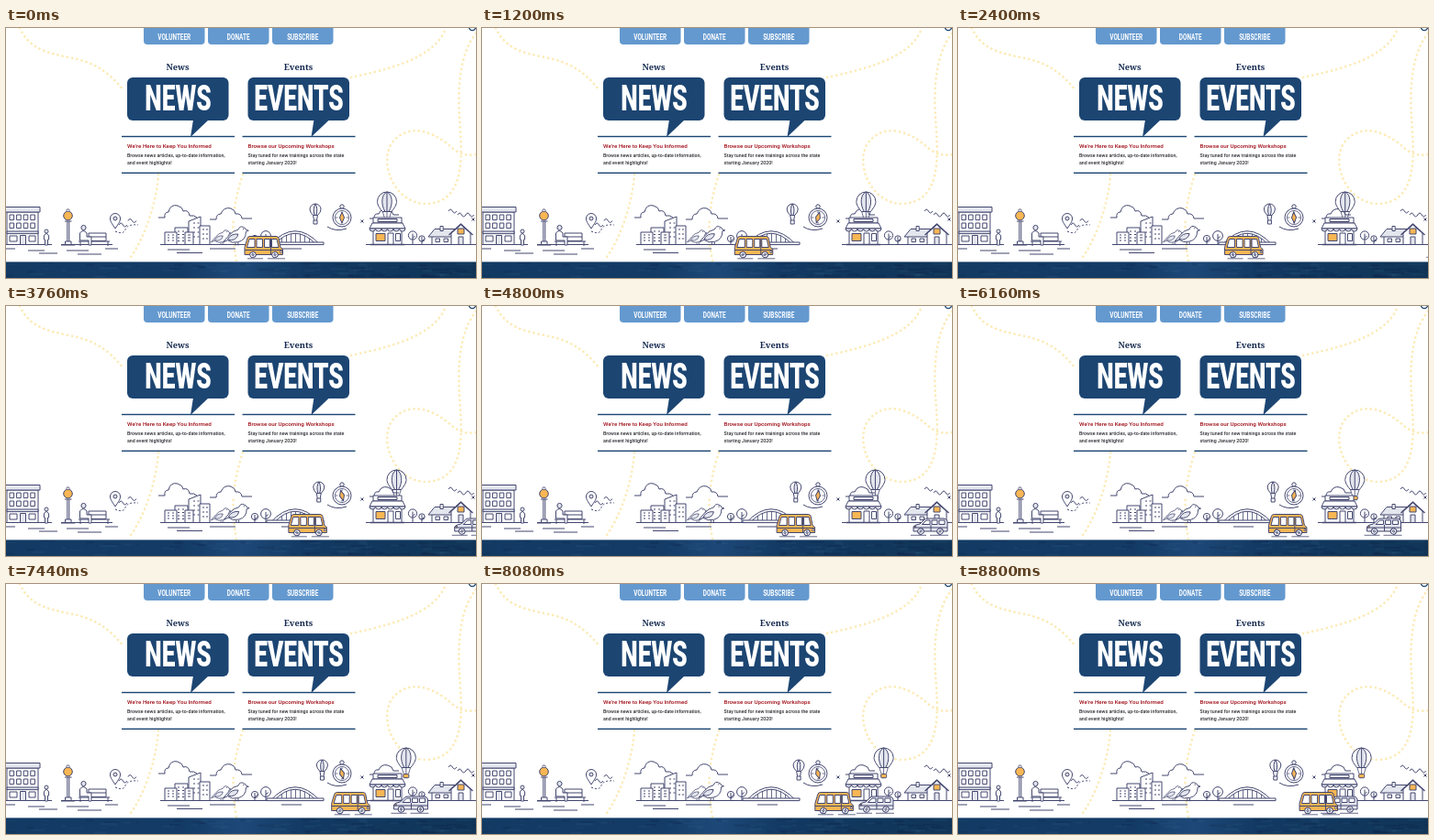
Animation, 512 px wide and 273 px high, one loop 8.88 s. Source, as an HTML page with a canvas:

```html
<!DOCTYPE html>
<html lang="en">
<head>
<meta charset="utf-8">
<title>News and Events</title>
<style>
  html, body { margin: 0; width: 100%; height: 100%; overflow: hidden; background: #fff; }
  canvas { display: block; width: 100vw; height: 100vh; }
</style>
</head>
<body>
<canvas id="stage"></canvas>
<script>
const W = 512, H = 273, LOOP = 8880, STEP = 80;
const NAVY = '#1c4572', LINE = '#43476f', ORANGE = '#f8b654', PALE = '#fcebb8', GREY = '#e4e6ee';
const canvas = document.getElementById('stage');
const ctx = canvas.getContext('2d');

function draw(d, fill, stroke = LINE, width = 1) {
  const p = new Path2D(d);
  if (fill) { ctx.fillStyle = fill; ctx.fill(p); }
  if (stroke) { ctx.strokeStyle = stroke; ctx.lineWidth = width; ctx.stroke(p); }
}

function box(x, y, w, h, fill = '#fff', r = 0, stroke = LINE) {
  ctx.beginPath();
  ctx.roundRect(x, y, w, h, r);
  if (fill) { ctx.fillStyle = fill; ctx.fill(); }
  if (stroke) { ctx.strokeStyle = stroke; ctx.lineWidth = 1; ctx.stroke(); }
}

function disc(x, y, r, fill = '#fff', stroke = LINE, width = 1) {
  ctx.beginPath();
  ctx.arc(x, y, r, 0, Math.PI * 2);
  if (fill) { ctx.fillStyle = fill; ctx.fill(); }
  if (stroke) { ctx.strokeStyle = stroke; ctx.lineWidth = width; ctx.stroke(); }
}

function at(x, y, fn, angle = 0) {
  ctx.save();
  ctx.translate(x, y);
  ctx.rotate(angle);
  fn();
  ctx.restore();
}

function text(s, x, y, font, color, align = 'left') {
  ctx.font = font;
  ctx.fillStyle = color;
  ctx.textAlign = align;
  ctx.fillText(s, x, y);
}

// narrow poster lettering, one squeeze for all sizes
function narrow(s, x, y, size, weight) {
  ctx.save();
  ctx.translate(x, y);
  ctx.scale(0.69, 1);
  text(s, 0, 0, `${weight} ${size}px Roboto, sans-serif`, '#fff', 'center');
  ctx.restore();
}

function trails() {
  ctx.save();
  ctx.lineCap = 'round';
  ctx.setLineDash([0.1, 5.2]);
  [
    'M15 0C26 24 46 27 68 32C96 37 112 48 128 68',
    'M166 160C164 190 152 228 134 253',
    'M258 160C248 190 244 220 251 254',
    'M376 54C412 46 468 34 479 0',
    'M512 6C494 28 492 66 494 98C496 132 504 192 456 192C424 190 406 150 420 126C440 100 470 116 486 131Q498 141 512 138'
  ].forEach(d => draw(d, null, PALE, 2.7));
  ctx.restore();
}

function panel(x, title, word, head, lines) {
  text(title, x + 55, 46, '900 9.3px "Noto Serif", serif', '#14294f', 'center');
  box(x, 54, 110.5, 47, NAVY, 6, null);
  draw(`M${x + 72} 100L${x + 69} 119L${x + 89} 100Z`, NAVY, null);
  narrow(word, x + 55.5, 90, 38, 900);
  ctx.fillStyle = NAVY;
  ctx.fillRect(x - 6, 117.8, 123, 1.4);
  ctx.fillRect(x - 6, 157.6, 123, 1.4);
  text(head, x, 130.5, '500 6.23px Roboto, sans-serif', '#9f0f18');
  lines.forEach((s, i) => text(s, x, 141 + i * 8, '500 5.25px Roboto, sans-serif', '#2d2d33'));
}

function header() {
  ['VOLUNTEER', 'DONATE', 'SUBSCRIBE'].forEach((s, i) => {
    const x = 150 + i * 70;
    box(x, -5, 66.5, 23, '#6499cf', 4, null);
    narrow(s, x + 33.2, 12.7, 9.3, 700);
  });
  disc(508, -1, 3.6, '#fff', NAVY, 1.4);
}

function footer() {
  const g = ctx.createLinearGradient(0, 0, W, 0);
  g.addColorStop(0, '#123a63');
  g.addColorStop(0.38, '#133b66');
  g.addColorStop(0.5, '#1d4878');
  g.addColorStop(0.64, '#123962');
  g.addColorStop(1, '#103558');
  ctx.fillStyle = g;
  ctx.fillRect(0, 255.4, W, 18);
  let seed = 7;
  const rnd = () => (seed = seed * 16807 % 2147483647) / 2147483647;
  for (let i = 0; i < 90; i++) {
    ctx.fillStyle = i % 2 ? 'rgba(70,120,160,.1)' : 'rgba(0,12,40,.12)';
    ctx.fillRect(rnd() * W, 256 + rnd() * 15, 4 + rnd() * 16, 1 + rnd() * 2);
  }
}

function tree(x, y, r) {
  disc(x, y, r);
  draw(`M${x} ${y - 2}V237M${x} ${y + 3}l2.5 -2.5`, null);
}

function waves(x, y, n) {
  draw(`M${x} ${y}` + 'q2.2 -4 4.4 0t4.4 0'.repeat(n), null);
}

function cross(x, y) {
  draw(`M${x - 1.5} ${y - 1.5}l3 3m0 -3l-3 3`, null);
}

function person(x, y) {
  disc(x, y, 2);
  draw(`M${x - 2.6} ${y + 9}V${y + 5}Q${x} ${y} ${x + 2.6} ${y + 5}V${y + 9}H${x + 1.5}V${y + 15}H${x - 1.5}V${y + 9}Z`, '#fff');
}

function ground() {
  draw('M0 236.5H50M60 236.5H116M168 236.5H344M392 236.5H512', null);
  draw('M0 241H10M24 243H42M36 246H56M66 243H90M78 247H104', null);
  draw('M108 241H122M176 242H200M186 245.5H214M222 241H250M300 241H322', null);
}

function office() {
  box(1, 201, 34, 35.5);
  box(-1, 195.5, 38, 5.5, GREY);
  for (let r = 0; r < 2; r++)
    for (let c = 0; c < 4; c++) box(4 + c * 7.6, 204 + r * 9, 4.6, 5.6);
  box(1, 222, 34, 2.6, GREY);
  box(4, 227, 8, 6);
  box(15.5, 226.5, 6, 10, GREY);
  box(25, 227, 7, 6);
  person(44, 222);
}

function lampAndBench() {
  draw('M66.8 211V233M68.8 211V233M64.5 236V233H71V236M64 211H71.5M60 237H75', null);
  disc(67.5, 205, 4.8, ORANGE);
  draw('M65.5 199.5L67.5 197.5L69.5 199.5', null);
  box(90, 224, 19, 8.5);
  draw('M90 228H109M79 233H113M81 233V238M111 233V238', null);
  disc(84.5, 218, 2.6, GREY);
  draw('M80.5 232V224Q84 219 88 224V228H93V237H90V232Z', '#fff');
}

function pin() {
  draw('M119 219C115 213 113.5 211 113.5 208A5.5 5.5 0 0 1 124.5 208C124.5 211 123 213 119 219Z', '#fff');
  disc(119, 208, 2, GREY);
  waves(123, 215, 1);
  waves(133, 210.5, 1);
  ctx.save();
  ctx.setLineDash([2, 2]);
  draw('M119 222Q128 226 130 220T144 215', null);
  ctx.restore();
}

function clouds() {
  draw('M166 207H173Q172 201 177 201Q179 192 187 194Q193 196 193 200Q199 198 200 205Q205 204 208 207', '#fff');
  draw('M222 209H229Q229 203 234 203Q237 195 245 197Q250 199 250 203Q256 202 257 208H268', '#fff');
  draw('M396 208H401Q401 202 406 203Q409 196 416 198Q421 199 422 204H428', '#fff');
  waves(482, 200, 1);
  waves(492, 204, 2);
  cross(388, 211);
  cross(509, 209);
}

function city() {
  draw('M199 236.5V211L212 206V236.5Z', '#fff');
  box(211, 216, 11, 20.5);
  box(184, 218, 14, 18.5);
  box(173, 223, 13, 13.5);
  box(195, 223, 9, 13.5);
  for (let i = 0; i < 4; i++) {
    draw(`M204 ${213 + i * 5}h2m2.5 0h2M187 ${222 + i * 3.5}h2m3 0h2`, null);
    if (i < 3) draw(`M214 ${220 + i * 5}h2m2 0h2M176 ${226 + i * 3}h2m3 0h2M198 ${226 + i * 3}h3`, null);
  }
}

function bird(k) {
  ctx.save();
  ctx.scale(k, k);
  draw('M-14 7L-7 -1Q-3 -6 3 -7Q5 -12 9 -10Q12 -9 12 -7L15 -6L12 -5Q12 5 3 7Q-4 9 -9 5Z', '#fff');
  draw('M-9 4Q-5 -3 3 -2Q2 4 -5 5ZM0 8V11M3 7.5V11', GREY);
  disc(9, -8, 0.7, LINE, null);
  ctx.restore();
}

function birds(t) {
  const hop = Math.sin(t * 2.1);
  at(234, 228.5, () => bird(0.75));
  at(250 + hop * 0.8, 227 - Math.abs(hop) * 0.6, () => bird(0.95));
}

function bridge() {
  draw('M288 236.5Q315 207 342 236.5', null);
  draw('M292 236.5Q315 212 338 236.5', null);
  for (let x = 295.5; x < 338; x += 5) {
    const u = (x - 292) / 46;
    draw(`M${x} 236V${236.5 - 49 * u * (1 - u)}`, null, LINE, 0.8);
  }
  box(284, 234, 62, 2.6);
}

function smallBalloon(t) {
  at(337 + t, 199, () => {
    draw('M-2.5 5L-1.5 11M2.5 5L1.5 11', null);
    draw('M-2.5 5.5Q-6 2 -6 -1A6 6 0 0 1 6 -1Q6 2 2.5 5.5Z', '#fff');
    draw('M-1 5.5Q-3 -2 0 -7Q3 -2 1 5.5Z', GREY);
    box(-2, 11, 4, 4);
  });
}

function compass(t) {
  draw('M350 217Q359 223 371 219', null);
  at(366, 207, () => {
    disc(0, -12, 2.2);
    disc(0, 0, 10);
    disc(0, 0, 7.6, '#fff', LINE, 0.8);
    draw('M-6.5 0H-5M5 0H6.5M0 -6.5V-5M0 5V6.5', null);
    at(0, 0, () => draw('M0 -6L2.5 0L0 6L-2.5 0Z', ORANGE), 0.3 * Math.sin(t * 1.4));
  });
}

function balloon(t) {
  at(415 + 2.8 * t, 190.5, () => {
    draw('M-5 9L-2.6 17M5 9L2.6 17M0 10V17', null, LINE, 0.8);
    draw('M-5 10C-9 5 -10.5 2 -10.5 -1A10.5 10.5 0 0 1 10.5 -1C10.5 2 9 5 5 10Z', '#fff');
    draw('M-2 10C-7 2 -6 -9 0 -11.5C6 -9 7 2 2 10Z', GREY);
    draw('M0 -11.5V10', null);
    box(-3, 17, 6, 4.2, ORANGE, 1);
  });
}

function shop() {
  box(400, 219, 31, 17.5);
  box(400, 207, 31, 6);
  box(405, 208.5, 21, 3, GREY);
  draw('M399 213H432L435 219H396Z', '#fff');
  for (let i = 0; i < 6; i++)
    draw(`M${396 + i * 6.5} 219a3.25 3 0 0 0 6.5 0Z`, i % 2 ? '#fff' : GREY);
  box(403, 224.5, 10, 8, ORANGE);
  box(416, 224, 6, 12.5);
  box(424.5, 224.5, 5, 8);
  draw('M397 236.5H434', null, LINE, 1.4);
}

function house() {
  tree(443, 226.5, 4.6);
  tree(453, 230, 3.2);
  box(464, 227, 23, 9.5);
  draw('M460 228L467 219.5H489L485 228Z', GREY);
  box(473, 216.5, 3.2, 5);
  draw('M485 236.5V224L495.5 215L506 224V236.5Z', '#fff');
  draw('M482.5 226L495.5 214L508.5 226', null, LINE, 1.3);
  box(492, 219, 7, 6, ORANGE);
  box(493, 228, 5, 8.5, GREY);
  box(468, 230, 4.5, 3.6);
  box(477, 230, 4.5, 3.6);
}

function wheel(x, spin) {
  at(x, 0, () => {
    disc(0, 0, 3.2);
    disc(0, 0, 1.2, GREY, LINE, 0.7);
    draw('M0 -2.6V2.6', null, LINE, 0.5);
  }, spin);
}

function bus(t) {
  const x = 260 + 12.73 * t;
  at(x, 247.5, () => {
    draw('M0 0V-8L3 -18Q3.5 -20 6 -20H34Q36.5 -20 37 -18L39 -8L41.5 -6V0Z', ORANGE);
    draw('M2.5 -8L5 -17H11V-8Z', '#fff');
    box(13, -17, 6.5, 9);
    box(21.5, -17, 6, 9);
    draw('M29.5 -17H35L37 -8H29.5Z', '#fff');
    draw('M28.5 -18V0M0 -5H41', null);
    disc(39.5, -3, 1);
    wheel(9, x / 3.2);
    wheel(33, x / 3.2);
    draw('M3 4.3H20M25 4.3H44', null, LINE, 0.8);
  });
}

function van(t) {
  const x = 470 - 18 * (t - 4.8);
  if (x > W + 2) return;
  at(x, 246, () => {
    draw('M0 0V-5Q1 -7 7 -8L12 -13Q13 -14 16 -14H33Q36 -14 37 -11V0Z', GREY);
    draw('M9.5 -7.5L14 -12H18V-7.5Z', '#fff');
    box(20, -12, 6, 4.5);
    box(28, -12, 6, 4.5);
    draw('M0 -4H37M19 -7V0', null);
    disc(2, -5, 0.9, ORANGE);
    wheel(8, -x / 3.2);
    wheel(29, -x / 3.2);
    draw('M-3 4.3H14M18 4.3H38', null, LINE, 0.8);
  });
}

function render(ms) {
  const t = Math.floor(ms % LOOP / STEP) * STEP / 1000;
  ctx.setTransform(canvas.width / W, 0, 0, canvas.height / H, 0, 0);
  ctx.lineJoin = 'round';
  ctx.fillStyle = '#fff';
  ctx.fillRect(0, 0, W, H);
  trails();
  header();
  panel(132, 'News', 'NEWS', 'We\u2019re Here to Keep You Informed',
    ['Browse news articles, up-to-date information,', 'and event highlights!']);
  panel(263.5, 'Events', 'EVENTS', 'Browse our Upcoming Workshops',
    ['Stay tuned for new trainings across the state', 'starting January 2020!']);
  ground();
  clouds();
  office();
  lampAndBench();
  pin();
  city();
  birds(t);
  tree(271, 230, 3.6);
  tree(283, 227, 5.4);
  bridge();
  smallBalloon(t);
  compass(t);
  balloon(t);
  shop();
  house();
  van(t);
  bus(t);
  footer();
}

function resize() {
  const dpr = window.devicePixelRatio || 1;
  canvas.width = Math.round(innerWidth * dpr);
  canvas.height = Math.round(innerHeight * dpr);
}

const start = performance.now();
function loop() {
  render(performance.now() - start);
  requestAnimationFrame(loop);
}
addEventListener('resize', resize);
resize();
loop();
</script>
</body>
</html>
```
